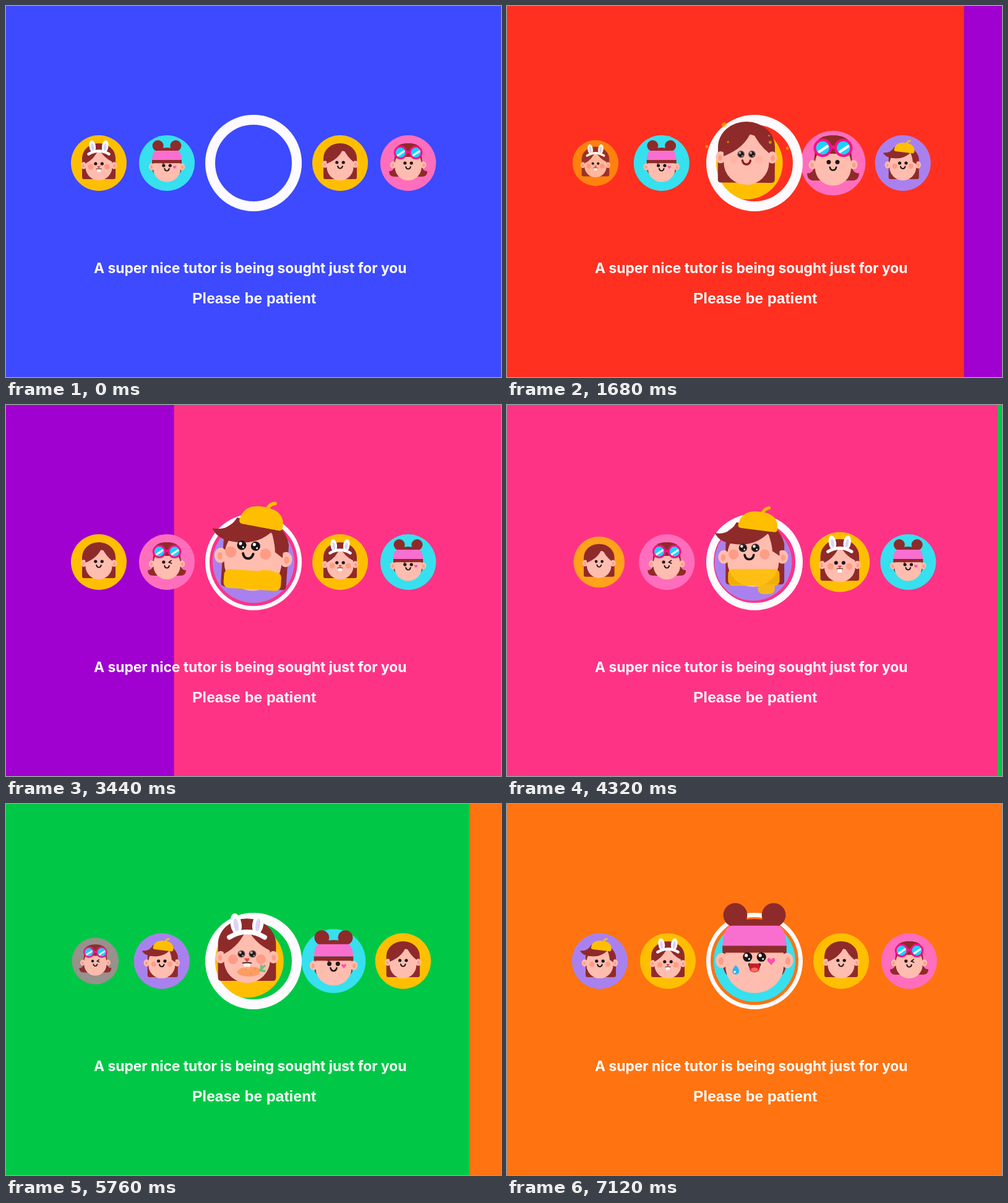
These frames come from a looping animation (800x600 px, 7.16 s). An HTML page:

```html
<!DOCTYPE html>
<html lang="en">
<head>
<meta charset="utf-8">
<title>Finding a tutor</title>
<style>
  html, body { margin: 0; width: 100%; height: 100%; overflow: hidden; }
  svg { display: block; width: 800px; height: 600px; }
  text { fill: #fff; }
  .main { font: 700 22.8px Inter, "Open Sans", sans-serif; }
  .sub { font: 700 24.5px "Liberation Sans", Arial, sans-serif; }
</style>
</head>
<body>
<svg viewBox="0 0 800 600">
  <rect id="base" width="800" height="600"/>
  <rect id="wipe" width="800" height="600"/>
  <g id="discs"></g>
  <circle id="ring" cx="400" cy="254" fill="none" stroke="#fdfbff"/>
  <g id="heads"></g>
  <text class="main" x="142" y="432">A super nice tutor is being sought just for you</text>
  <text class="sub" x="301" y="481">Please be patient</text>
</svg>
<script>
const LOOP = 7160, SLIDE = 490, WIPE = 800;
const slideAt = [300, 1510, 2870, 4240, 5603];
const wipeAt = [393, 1545, 2954, 4275, 5638];
const grounds = ['#3d4aff', '#ff3020', '#a000d0', '#ff3385', '#00c846', '#ff7310'];
const seatX = { '-3': 75, '-2': 150, '-1': 260, 0: 400, 1: 540, 2: 650, 3: 725 };
const HAIR = '#8f2a2a', SKIN = '#ffbdaf', BLUSH = '#ff9c86', DARK = '#1c1416', GOLD = '#ffbf00';

// drawing helpers
const shape = (d, fill, more = '') => `<path d="${d}" fill="${fill}" ${more}/>`;
const oval = (x, y, rx, ry, fill, more = '') =>
  `<ellipse cx="${x}" cy="${y}" rx="${rx}" ry="${ry}" fill="${fill}" ${more}/>`;
const dot = (x, y, r, fill, more) => oval(x, y, r, r, fill, more);
const box = (x, y, w, h, r, fill) =>
  `<rect x="${x}" y="${y}" width="${w}" height="${h}" rx="${r}" fill="${fill}"/>`;
const line = (d, color, width, more = '') =>
  `<path d="${d}" fill="none" stroke="${color}" stroke-width="${width}" stroke-linecap="round" ${more}/>`;
const group = (name, inner) => `<g class="${name}">${inner}</g>`;
const both = (f) => f(-1) + f(1);

const ears = y => both(s => oval(24.5 * s, y, 4.7, 5.7, SKIN) + oval(25 * s, y + .5, 1.9, 2.8, BLUSH));
const skull = box(-21.5, -20, 43, 48, 21.3, SKIN);
const bob = shape('M-27 23V-8A27 24 0 0 1 27 -8V23Q27 26 24 26H-24Q-27 26 -27 23Z', HAIR);
const bangs = p => shape(`M${p} -24Q${p - 6} -7 -21.7 1V-14Q-16 -30 ${p} -31Z`, HAIR) +
  shape(`M${p} -24Q${p + 6} -10 21.7 -2V-14Q18 -28 ${p} -31Z`, HAIR);
const eyes = y => both(s => dot(5.2 * s, y, 2.6, DARK));
const bright = y => both(s => dot(5.2 * s, y, 3.5, DARK) +
  dot(5.2 * s - 1, y - 1.2, 1.2, '#fff') + dot(5.2 * s + 1.2, y + 1.4, .7, '#fff'));
const smile = (y, color = DARK) => line(`M-3.8 ${y}Q-3 ${y + 3.6} 0 ${y + 3.6}T3.8 ${y}`, color, 1.9);
const blush = (x, y, r, more) => both(s => dot(x * s, y, r, BLUSH, more));

const bobHead = bob + ears(2) + skull + bangs(5) + eyes(-1) + smile(5) +
  group('extra', blush(12, 4, 3.8, 'opacity=".45"') + bright(-1) + smile(5, '#f3202c') +
    group('sparks', dot(-17, -23, 2, GOLD) + dot(-14, -10, .8, GOLD) + dot(17, -15, .7, GOLD) +
      dot(18, -10, 1.2, GOLD) + dot(-30, -6.5, 1.2, GOLD) + dot(31, -5.5, 1.2, GOLD)));

const lens = x => dot(x, -17, 9.4, '#1ad3fb', 'stroke="#ff0f8a" stroke-width="3"') +
  line(`M${x - 4} -12.6L${x + 5.5} -19`, '#fff', 3.2);
const goggleHead =
  shape('M-21 -18Q-20 -32 0 -32T21 -18L24 10Q27 14 31 13Q31 22 22 22H-22Q-31 22 -31 13Q-27 14 -24 10Z',
    HAIR, 'class="hair"') +
  ears(3) + skull + shape('M-21.6 -10V-18Q-20 -32 0 -32T21.6 -18V-10Z', HAIR, 'class="hair"') +
  dot(-5.2, 0, 2.6, DARK) + group('open', dot(5.2, 0, 2.6, DARK)) +
  group('wink', line('M7.2 -2.6L3.4 .2L7.4 2', DARK, 1.7)) + smile(6) +
  group('extra', blush(12.5, 5, 4.2) +
    shape('M14 -11Q14.6 -7.6 18 -7Q14.6 -6.4 14 -3Q13.4 -6.4 10 -7Q13.4 -7.6 14 -11Z', GOLD)) +
  group('goggles', line('M-4 -18H4', '#ff0f8a', 4) + lens(-12.4) + lens(12.4));

const capHead =
  shape('M-23 23V-8A25 24 0 0 1 26 -8V23Q26 26 23 26H-20Q-23 26 -23 23Z', HAIR) +
  ears(3) + skull + shape('M10 -24Q16 -8 16 -2L22 2V-16Z', HAIR) +
  shape('M-32 -17Q-20 -15 -14 -26L16 -21Q4 -5 -17 -8Q-28 -9 -32 -17Z', HAIR) +
  group('features', blush(13, 5, 4.2) + eyes(0) + smile(5.5) + group('extra', bright(-.5))) +
  group('cap', `<g transform="rotate(7)">` +
    shape('M-17 -22Q-16 -35 0 -35T16 -22Q16 -19.5 13 -19.5H-14Q-17 -19.5 -17 -22Z', GOLD) +
    line('M2 -34Q3 -38 7 -39', GOLD, 2.6) + '</g>') +
  group('extra', group('tail', box(4, 20, 14, 14, 4, GOLD)) + box(-21, 13, 43, 14, 4, GOLD));

const bunnyHead = bob + ears(4) + skull + bangs(0) +
  both(s => `<g transform="rotate(${9 * s} ${9 * s} -19)">` +
    oval(9 * s, -27, 5.2, 10, '#fff') + oval(9 * s, -26, 2.2, 6.2, '#dcd3f7') + '</g>') +
  line('M-16.5 -14.5Q0 -24.5 16.5 -14.5', '#fff', 4.4) +
  blush(13, 6, 4.6) + eyes(1) +
  line('M-4 9.5Q0 8.5 4 9.5', DARK, .9) + shape('M-2.8 5H2.8L0 9Z', '#f5404e') +
  both(s => box(s < 0 ? -2.9 : .2, 10, 2.7, 4.6, .7, '#fff')) +
  group('extra', bright(1) + '<g transform="translate(1.5 0)">' +
    shape('M-11 18Q-7 12 2 13Q11 13 11 17Q10 22 0 22Q-8 22 -11 18Z', '#ff8a35') +
    line('M-3 14V16M2 18V20M6 14V16', '#e06a1c', .8) +
    line('M11 16L15 12M11.5 16.5L15 17M11.5 15L12 12', '#25b96a', 2) + '</g>');

const heart = shape('M12.5 9.5L9.8 6.6Q9.2 4 11.2 4.2L12.5 5.4L13.8 4.2Q15.8 4 15.2 6.6Z', '#ff4fae');
const bunHead = both(s => dot(14.4 * s, -28, 9, HAIR)) + shape('M-16 -19Q-13 -25 0 -25T16 -19Z', HAIR) +
  shape('M-24 0H24V8Q23 16 20 17H-20Q-23 16 -24 8Z', HAIR) + ears(6) +
  shape('M-21.8 -2H21.8V10A21.8 20.5 0 0 1 -21.8 10Z', SKIN) +
  shape('M-24 -5Q-23 -20 -17 -20H17Q23 -20 24 -5Z', '#f96fd0') +
  shape('M-24 -5H24V.2H-4L-6 1.8L-8 .2H-24Z', HAIR) +
  eyes(4) + smile(9) + heart +
  group('extra', bright(3.5) + shape('M-4 8.4H4Q4.6 15 0 15T-4 8.4Z', '#c21f2c') +
    oval(0, 13, 2.7, 1.6, '#ff6a5c') +
    shape('M-14 9.5Q-10.8 13 -11.6 15.2A2.7 2.7 0 0 1 -16.6 14.4Q-16.4 12 -14 9.5Z', '#25b8f0') +
    dot(-14.8, 14.6, .8, '#fff'));

const cast = [
  { disc: GOLD, art: bobHead },
  { disc: '#ff6ebd', art: goggleHead },
  { disc: '#a981ee', art: capHead },
  { disc: GOLD, art: bunnyHead },
  { disc: '#36e0ef', art: bunHead }
];

const $ = id => document.getElementById(id);
$('discs').innerHTML = cast.map(c => `<circle cy="254" fill="${c.disc}"/>`).join('');
$('heads').innerHTML = cast.map(c => `<g>${c.art}</g>`).join('');
cast.forEach((c, k) => {
  c.circle = $('discs').children[k];
  c.head = $('heads').children[k];
  c.extras = c.head.querySelectorAll('.extra');
});
const part = (k, name) => cast[k].head.querySelector('.' + name);
const sparks = part(0, 'sparks'), goggles = part(1, 'goggles');
const cap = part(2, 'cap'), tail = part(2, 'tail'), features = part(2, 'features');
const openEye = part(1, 'open'), winkEye = part(1, 'wink');
const hair = cast[1].head.querySelectorAll('.hair');

const clamp = v => Math.max(0, Math.min(1, v));
const smooth = u => u * u * (3 - 2 * u);
const wrap = n => ((n + 2) % 5 + 5) % 5 - 2;
const set = (el, name, value) => el.setAttribute(name, value);
const move = (el, x, y) => set(el, 'transform', `translate(${x} ${y})`);
const latest = (times, t) => Math.max(0, times.filter(s => s <= t).length - 1);

// cubic-bezier(.85, 0, .3, 1)
function glide(u) {
  let lo = 0, hi = 1, s = .5;
  for (let i = 0; i < 24; i++) {
    s = (lo + hi) / 2;
    const x = 2.55 * (1 - s) ** 2 * s + .9 * (1 - s) * s * s + s ** 3;
    if (x < u) lo = s; else hi = s;
  }
  return smooth(s);
}

function pose(k, i, u) {
  const to = wrap(k - i);
  const from = i ? wrap(k - i + 1) : k < 3 ? k + 1 : to;
  const mix = (a, b) => seatX[a] + (seatX[b] - seatX[a]) * glide(u);
  if (from === 3 || from === -2 && to === 2) {
    const leaving = from === -2 && u < .8;
    if (leaving) return { x: mix(-2, -3), size: 1 - .5 * u, alpha: 1 - u / .8, q: 0 };
    const v = clamp((u - .8) / .2);
    return { x: mix(3, 2), size: .5 + .5 * v, alpha: v, q: 0 };
  }
  const q = from === to ? 0 : to === 0 ? u : from === 0 ? 1 - u : 0;
  return { x: mix(from, to), size: 1, alpha: 1, q };
}

function tiltOf(k, age) {
  if (k === 1) return 11 * smooth(clamp(age / 350));
  if (k === 2) return 5 * Math.cos(age / 200) * Math.exp(-Math.max(age, 0) / 400);
  return k === 0 ? 2 * Math.cos(age / 180) : 0;
}

function draw(t) {
  const w = latest(wipeAt, t);
  set($('base'), 'fill', grounds[w]);
  set($('wipe'), 'fill', grounds[w + 1]);
  set($('wipe'), 'x', 800 * (1 - smooth(clamp((t - wipeAt[w]) / WIPE))));

  const i = latest(slideAt, t), u = clamp((t - slideAt[i]) / SLIDE);
  const width = 7 + 9 * Math.min(1, i ? u / .3 : 1, (1 - u) / .25);
  set($('ring'), 'stroke-width', width);
  set($('ring'), 'r', 78 - width / 2);

  cast.forEach((c, k) => {
    const { x, size, alpha, q } = pose(k, i, u);
    const age = t - slideAt[k] - SLIDE;
    const scale = size * (1 + .467 * q) * (1 + .47 * q);
    const rise = 14 * smooth(clamp((q - .25) * 2));
    set(c.circle, 'cx', x);
    set(c.circle, 'r', size * (45 + 21 * q));
    set(c.circle, 'opacity', alpha);
    // a head stays solid longer than its disc
    set(c.head, 'opacity', clamp(1.6 * alpha));
    set(c.head, 'transform', `translate(${x} ${254 - rise}) rotate(${tiltOf(k, age) * q}) scale(${scale})`);
    c.extras.forEach(e => set(e, 'opacity', clamp((q - .3) / .6)));

    if (k === 0) set(sparks, 'transform', `scale(${1 + .0003 * (age - 50)})`);
    if (k === 1) {
      const winked = age > 250;
      set(openEye, 'opacity', winked ? 0 : 1);
      set(winkEye, 'opacity', winked ? 1 : 0);
      move(goggles, 0, -9 * q * smooth(clamp(age / 250)));
      hair.forEach(h => set(h, 'fill', q > .9 ? '#1d1718' : HAIR));
    }
    if (k === 2) {
      move(features, -4 * q, -5 * q);
      move(cap, 2 * q, 2 - 2.5 * q);
      move(tail, 0, -8 * (1 - smooth(clamp((age - 120) / 250))));
    }
  });
}

const begin = performance.now();
function tick() {
  draw((performance.now() - begin) % LOOP);
  requestAnimationFrame(tick);
}
tick();
</script>
</body>
</html>
```
